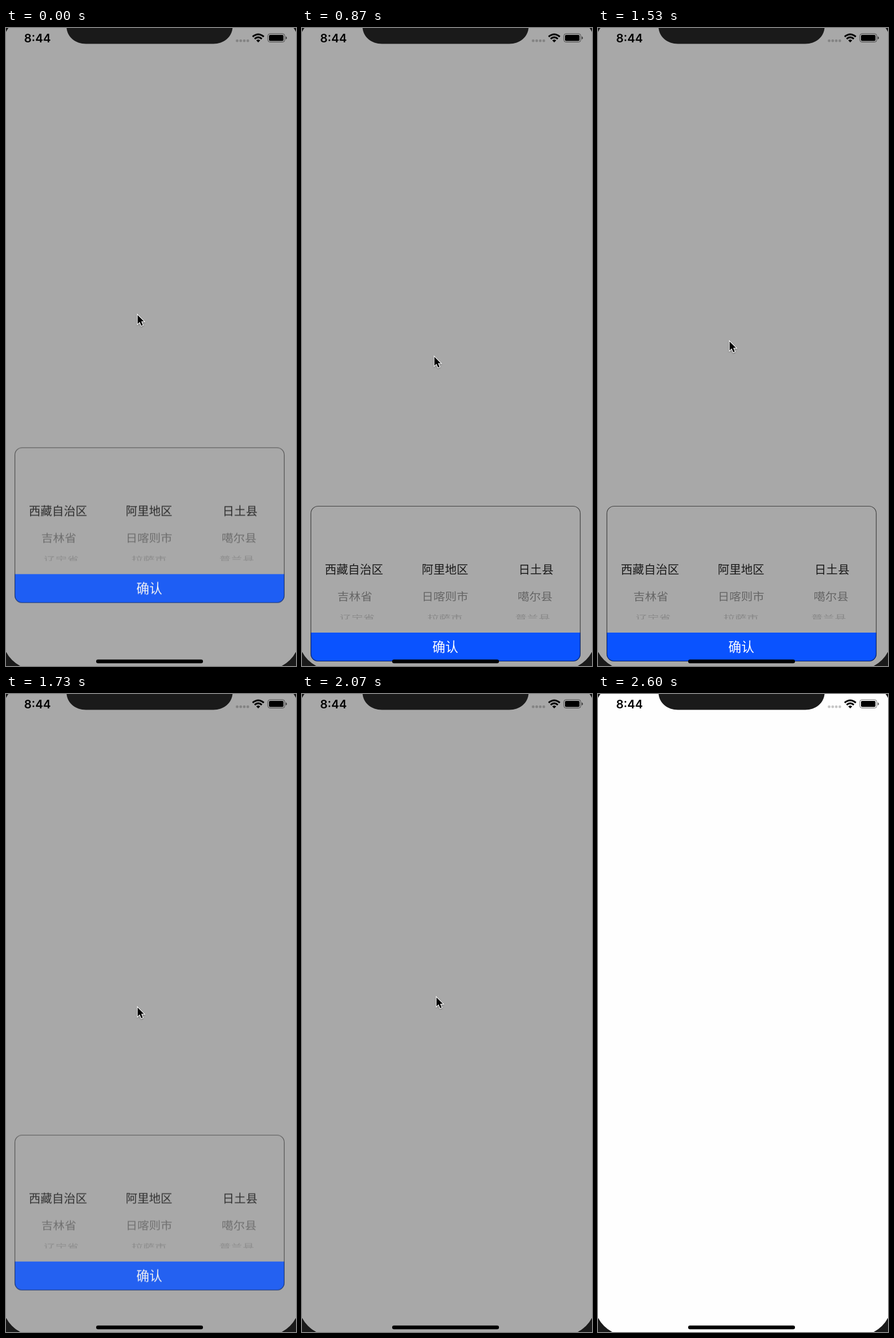
These frames come from a looping animation (505x1108 px, 3390 ms). An HTML page:

```html
<!DOCTYPE html>
<html lang="zh-CN">
<head>
<meta charset="utf-8">
<title>Region picker</title>
<style>
  html, body { margin: 0; width: 100%; height: 100%; overflow: hidden; background: #1a1a1a; }
  svg { display: block; width: 505px; height: 1108px; }
  text { text-anchor: middle; font-family: "Noto Sans CJK SC", "Noto Sans CJK", sans-serif; font-weight: 350; }
  .time { font: 600 20.4px Inter, sans-serif; }
  #cursor { filter: drop-shadow(0 1.5px 1px rgba(0, 0, 0, .35)); }
</style>
</head>
<body>
<svg viewBox="0 0 505 1108">
  <defs>
    <clipPath id="card"><rect x="15" width="470" height="270" rx="13"/></clipPath>
    <clipPath id="window"><rect width="505" height="197"/></clipPath>
  </defs>

  <rect id="screen" x="-7" y="-25" width="519" height="1140" rx="60"/>

  <g id="panel">
    <g id="wheel" clip-path="url(#window)"></g>
    <rect y="220" x="15" width="470" height="50" fill="#0a53ff" clip-path="url(#card)"/>
    <text x="249.5" y="253" font-size="22.5" fill="#fff">确认</text>
    <rect x="15.5" y=".5" width="469" height="269" rx="12.5" fill="none" stroke="#000" stroke-opacity=".6" stroke-width="1.2"/>
  </g>

  <path d="M105.5 0C107 16 121 27.5 139 27.5H361C379 27.5 393 16 394.5 0Z" fill="#1a1a1a"/>
  <text class="time" x="54.8" y="24.7">8:44</text>
  <path d="M402.5 22.2H422" stroke="#000" stroke-opacity=".22" stroke-width="4.8" stroke-linecap="round" stroke-dasharray="0 6.2"/>
  <g fill="none" stroke="#000" stroke-width="3">
    <path d="M429.5 15.2Q439.2 6.8 449 15.2"/>
    <path d="M433 18.8Q439.2 13.4 445.5 18.8"/>
    <path d="M435.8 21.6Q439.2 18.6 442.7 21.6L439.2 25Z" fill="#000" stroke="none"/>
  </g>
  <rect x="455.9" y="9.9" width="29.6" height="14.6" rx="4" fill="none" stroke="#000" stroke-opacity=".55"/>
  <rect x="458" y="12" width="25.2" height="10.4" rx="2"/>
  <path d="M487 14.6Q489.2 15.2 489.2 17.2T487 19.8Z" fill-opacity=".6"/>
  <rect x="157" y="1096.8" width="186" height="6.4" rx="3.2"/>

  <path id="cursor" d="M1.2 2.5V18L4.8 14.6 7.6 21 10.2 19.9 7.5 13.6H12.3Z"
        stroke="#fff" stroke-width="2.2" paint-order="stroke"/>
</svg>
<script>
const LOOP = 3390;
const TICK = 1000 / 15;
const REST = 830;
const $ = id => document.getElementById(id);
const clamp = u => Math.min(1, Math.max(0, u));
const smooth = u => u * u * (3 - 2 * u);

// Labels sit on a drum: rows further round are flatter, paler and closer to the middle
function buildWheel() {
  const columns = [
    ['西藏自治区', '吉林省', '辽宁省'],
    ['阿里地区', '日喀则市', '拉萨市'],
    ['日土县', '噶尔县', '普兰县']
  ];
  columns.forEach((labels, col) => labels.forEach((label, row) => {
    const angle = .48 * row;
    const squeeze = Math.cos(angle);
    const x = 249 + (col - 1) * 158.5 * (1 - .085 * (1 - squeeze));
    const y = 110 + 102 * Math.sin(angle);
    const text = document.createElementNS('http://www.w3.org/2000/svg', 'text');
    text.setAttribute('transform', `translate(${x} ${y}) scale(1 ${squeeze})`);
    text.setAttribute('y', 7.6);
    text.setAttribute('font-size', 20.3);
    text.setAttribute('fill', '#1a1a1a');
    text.setAttribute('opacity', .47 ** row);
    text.textContent = label;
    $('wheel').append(text);
  }));
}

// Back easing: away is 0 at rest and 1 when fully dismissed
const lift = away => 1014 * away * away * (2 - 3 * away);

function panelAt(t) {
  const opening = clamp((200 - t) / 357);
  const closing = clamp((t - 1640) / 430);
  return {
    y: REST - lift(opening + closing),
    alpha: 1 - .23 * opening - .75 * closing
  };
}

// Pointer stops: time, x, y
const stops = [
  [800, 228, 496], [1100, 228, 1071], [1200, 228, 1071], [1533, 228, 542],
  [1900, 228, 542], [2066, 233, 524.5], [2133, 222, 442.5], [2266, 74, 248],
  [2400, 74, 248], [2600, -16, -26]
];

function cursorAt(t) {
  const next = stops.findIndex(stop => stop[0] > t);
  const to = stops.at(next);
  const from = stops[Math.max(0, next < 0 ? stops.length - 1 : next - 1)];
  const u = smooth(clamp((t - from[0]) / (to[0] - from[0] || 1)));
  const swing = 97 * Math.sin(Math.PI * clamp((t - 800) / 600)) ** 4;
  return [
    from[1] + (to[1] - from[1]) * u + swing,
    from[2] + (to[2] - from[2]) * u
  ];
}

function draw(now) {
  // Motion advances at 15 steps per second
  const t = Math.floor((now % LOOP + 3.4) / TICK) * TICK;
  const { y, alpha } = panelAt(t);
  $('screen').setAttribute('fill', t < 2130 ? '#a8a8a8' : '#fefefe');
  $('panel').setAttribute('transform', `translate(0 ${y})`);
  $('panel').setAttribute('opacity', alpha);
  $('cursor').setAttribute('transform', `translate(${cursorAt(t)})`);
}

buildWheel();
const start = performance.now();
function tick() {
  draw(performance.now() - start);
  requestAnimationFrame(tick);
}
tick();
</script>
</body>
</html>
```
